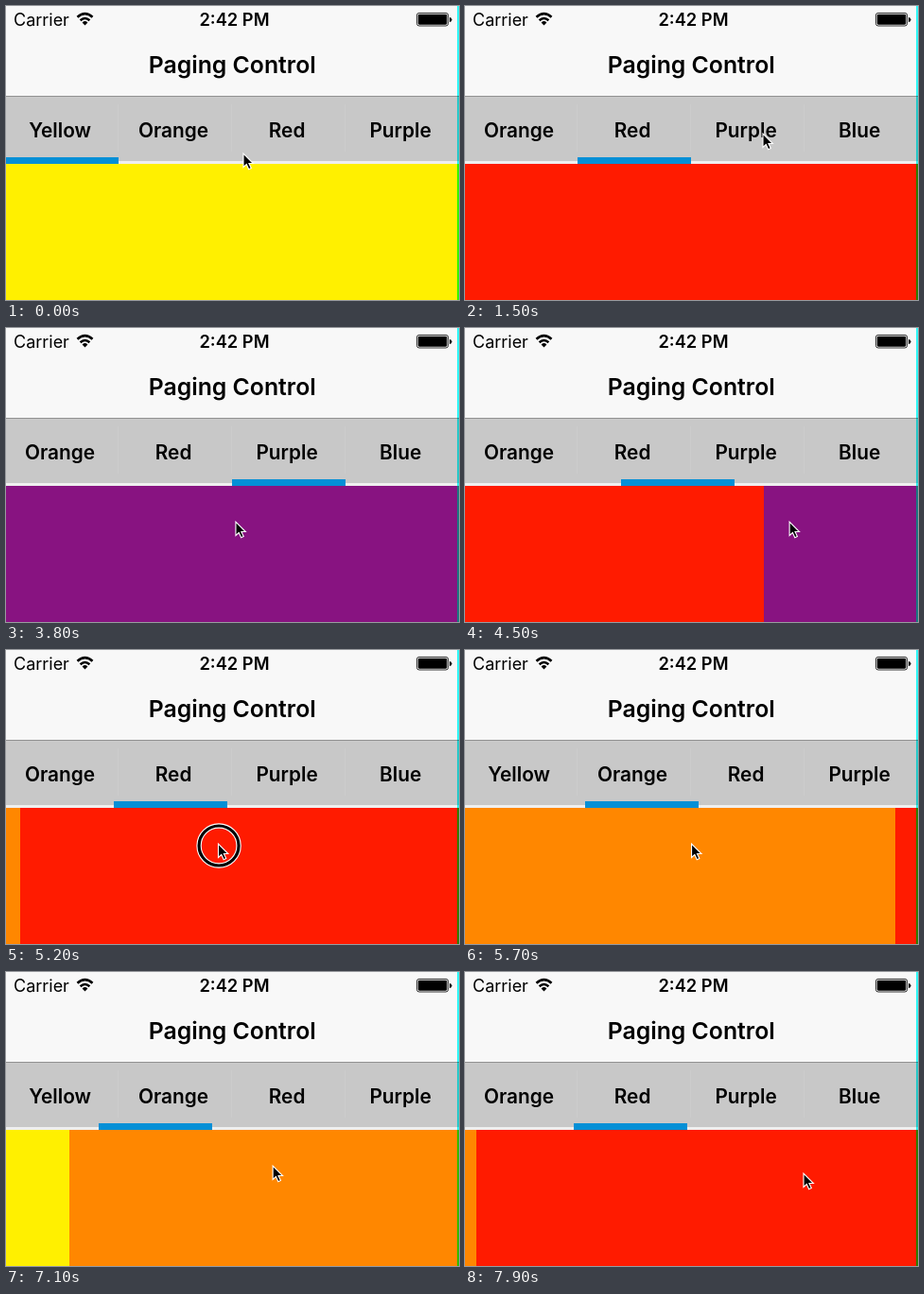
An HTML page for the animation above (8 s loop, 479 px wide and 311 px high).

```html
<!DOCTYPE html>
<html lang="en">
<head>
<meta charset="utf-8">
<title>Paging Control</title>
<style>
  html, body { margin: 0; width: 100%; height: 100%; overflow: hidden; background: #f8f8f8; }
  svg { display: block; width: 100vw; height: 100vh; }
  text { font-family: Inter, "Liberation Sans", sans-serif; fill: #000; }
  .bold { font-weight: 600; text-anchor: middle; }
  .multiply { mix-blend-mode: multiply; }
  .screen { mix-blend-mode: screen; }
</style>
</head>
<body>
<svg viewBox="0 0 479 311" xmlns="http://www.w3.org/2000/svg">
  <rect width="479" height="311" fill="#f8f8f8"/>
  <text x="8" y="21" font-size="18">Carrier</text>
  <g fill="none" stroke="#000" stroke-width="2.6">
    <path d="M75.5 11.8Q83.5 4.6 91.5 11.8"/>
    <path d="M78.6 15.2Q83.5 10.8 88.4 15.2"/>
  </g>
  <path d="M80.6 17.4Q83.5 14.8 86.4 17.4L83.5 20.6Z"/>
  <text class="bold" x="241.5" y="21" font-size="18.3">2:42 PM</text>
  <rect x="434.4" y="7.4" width="33.2" height="13.6" rx="2.5" fill="none" stroke="#000" stroke-width=".8"/>
  <rect x="435.7" y="8.7" width="30.6" height="11" rx="1.4"/>
  <path d="M469 12Q471.5 12.4 471.5 14.5T469 17Z"/>
  <text class="bold" x="239.2" y="71" font-size="24.8">Paging Control</text>

  <rect y="95" width="479" height="1" fill="#929292"/>
  <rect y="96" width="479" height="68" fill="#c8c8c8"/>
  <rect y="164" width="479" height="3" fill="#efefef"/>
  <g id="menu"></g>
  <rect id="marker" y="160" width="120" height="7" fill="#048fd6"/>
  <g id="pages"></g>
  <rect class="multiply" x="477" width="2" height="311" fill="#32ffff"/>
  <rect class="screen" x="477" y="167" width="2" height="144" fill="#006a00"/>

  <g id="pointer">
    <g id="press" fill="none">
      <circle cx=".6" cy="2" r="21" stroke="#fff" stroke-width="5.4"/>
      <circle cx=".6" cy="2" r="21" stroke="#000" stroke-width="3.2"/>
    </g>
    <path d="M0 0V14.5L3.3 11.5L5.7 16.8L8.3 15.6L5.9 10.5H10.4Z" stroke="#fff" stroke-width="1.1"/>
  </g>
</svg>
<script>
const LOOP = 8000, WIDTH = 479, TAB = 120;
const DRAG = 260, SETTLE = 400, GLIDE = 250, PULL = 0.3;
const tabs = [
  ["Yellow", "#fff000"], ["Orange", "#ff8700"], ["Red", "#ff1b00"],
  ["Purple", "#881381"], ["Blue", "#000cff"]
];

const clamp = (v, min = 0, max = 1) => Math.min(max, Math.max(min, v));
const mix = (a, b, u) => a + (b - a) * u;
const smooth = u => u * u * (3 - 2 * u);
const easeOut = u => 1 - (1 - u) ** 2;
const progress = (t, from, length) => clamp((t - from) / length);

// A move rests the pointer somewhere; taps and swipes also change the page.
const move = (at, x, y) => ({ at, x, y, pull: 0, hold: 0 });
const tap = (at, x, y, page) => ({ ...move(at, x, y), page, hold: 150 });
const swipe = (at, page, side) => ({
  ...move(at, 281 - side * 72, 205), page, hold: DRAG, pull: PULL, travel: side * PULL * WIDTH
});
const RIGHT = 1, LEFT = -1;

const steps = [
  move(0, 251, 156),
  tap(880, 315, 135, 2),
  move(1500, 315, 135),
  tap(1930, 375, 138, 4),
  move(2500, 375, 138),
  move(2600, 338, 142),
  swipe(2850, 3, RIGHT),
  swipe(4120, 2, RIGHT),
  swipe(5148, 1, RIGHT),
  swipe(5825, 0, RIGHT),
  move(6280, 495, 215),
  swipe(6620, 1, LEFT),
  swipe(7318, 2, LEFT),
  move(7900, 358, 213)
];

function pageAt(t) {
  return steps.filter(s => s.page !== undefined).reduce((page, s) => {
    const moved = s.pull
      ? s.pull * smooth(progress(t, s.at, DRAG)) + (1 - s.pull) * easeOut(progress(t, s.at + DRAG, SETTLE))
      : smooth(progress(t, s.at, GLIDE));
    return mix(page, s.page, moved);
  }, 0);
}

// The menu keeps one tab to the left of the chosen one, once a finger lifts.
function menuAt(t) {
  return steps.filter(s => s.page !== undefined).reduce((slot, s) => {
    const lifted = s.pull ? s.at + DRAG : s.at;
    return mix(slot, clamp(s.page - 1), smooth(progress(t, lifted, GLIDE)));
  }, 0) * TAB;
}

function pointerAt(t) {
  const i = steps.findLastIndex(s => s.at <= t);
  const now = steps[i], next = steps[i + 1] || now;
  const dragged = now.travel ? now.travel * smooth(progress(t, now.at, now.hold)) : 0;
  const free = now.at + now.hold;
  const u = smooth(progress(t, free, Math.max(1, next.at - free)));
  return {
    x: mix(now.x + dragged, next.x, u),
    y: mix(now.y, next.y, u),
    pressed: t < free
  };
}

const at = id => document.getElementById(id);
const shift = (id, x, y = 0) => at(id).setAttribute("transform", `translate(${x} ${y})`);

at("menu").innerHTML = tabs.map(([name], i) =>
  `<rect x="${i * TAB - 2}" y="104" width="1" height="50" fill="#cccccc"/>
   <text class="bold" x="${i * TAB + 57.1}" y="138.5" font-size="20.8">${name}</text>`).join("");
at("pages").innerHTML = tabs.map(([, color], i) =>
  `<rect x="${i * WIDTH}" y="167" width="${WIDTH}" height="144" fill="${color}"/>`).join("");

function draw(t) {
  const page = pageAt(t), scroll = menuAt(t), pointer = pointerAt(t);
  const marked = page + 0.05 * Math.sin(2 * Math.PI * page);
  shift("pages", -Math.round(page * WIDTH));
  shift("menu", -Math.round(scroll));
  shift("marker", Math.round(marked * TAB - scroll) - 1);
  shift("pointer", pointer.x, pointer.y);
  at("press").setAttribute("visibility", pointer.pressed ? "visible" : "hidden");
}

const start = performance.now();
function tick() {
  draw((performance.now() - start) % LOOP);
  requestAnimationFrame(tick);
}
tick();
</script>
</body>
</html>
```
